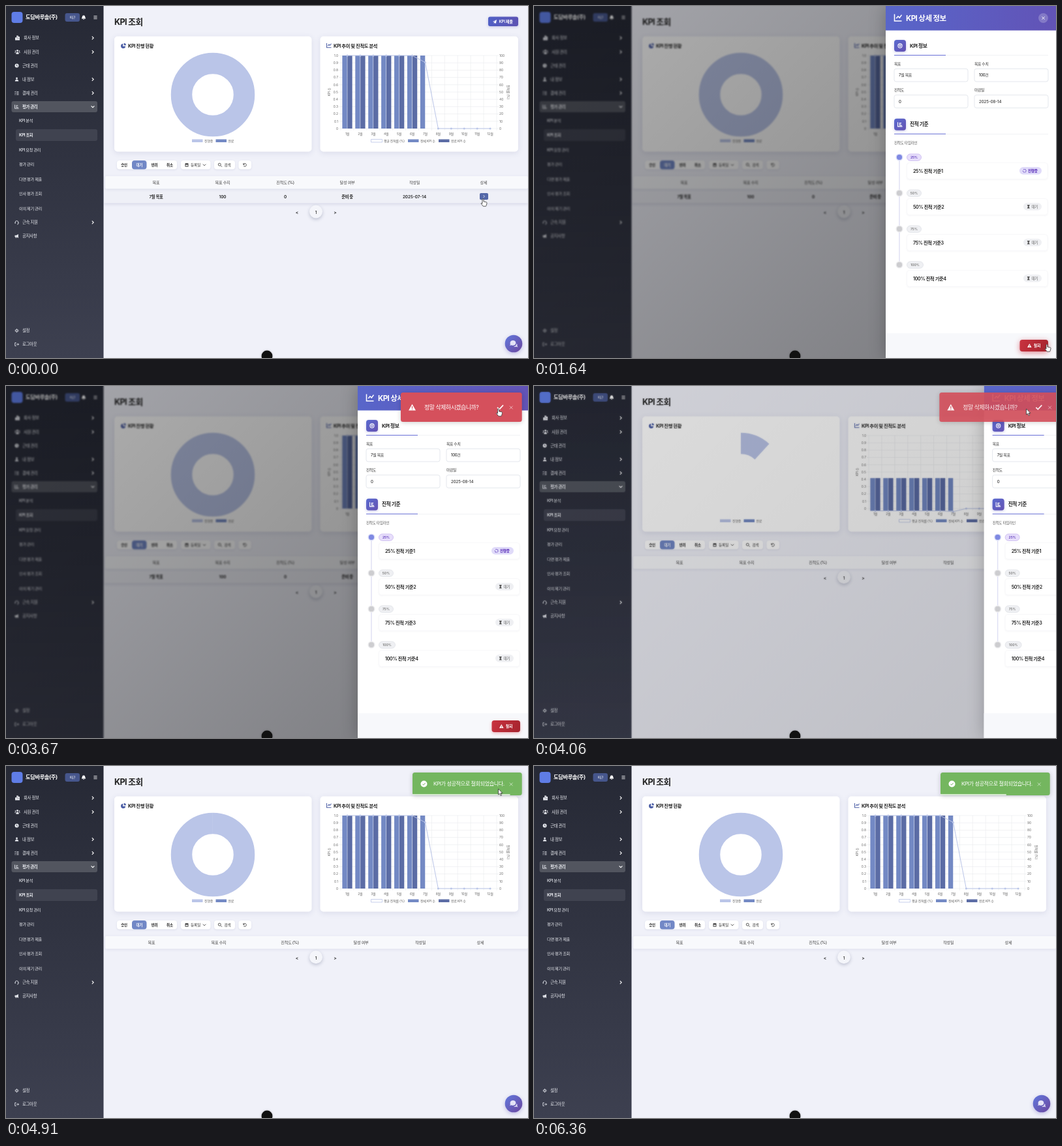
An HTML page with a canvas that plays this animation: 800x540 px, repeating every 6390 ms.

```html
<!DOCTYPE html>
<html lang="ko">
<head>
<meta charset="utf-8">
<style>
html, body { margin: 0; width: 100%; height: 100%; overflow: hidden; background: #f0f1f9; }
canvas { display: block; }
</style>
</head>
<body>
<canvas id="stage" width="800" height="540"></canvas>
<script>
const LOOP = 6390, W = 800, H = 540;
const stage = document.getElementById('stage').getContext('2d');
const pageCanvas = Object.assign(document.createElement('canvas'), { width: W, height: H });
const page = pageCanvas.getContext('2d');
let c = page;

// Icons sit in a box from -5 to 5; a leading ~ means outlined.
const ICONS = {
  city: 'M-5-1h3v-4h4v2h3v8h-10zM-1-3v1.2h1.2v-1.2zM-1 0v1.2h1.2v-1.2zM2 0v1.2h1.2v-1.2z',
  users: 'M-2-3a2 2 0 1 0 4 0a2 2 0 1 0-4 0M-3 4.5v-1.5a3 3 0 0 1 6 0v1.5zM-5.5-2a1.3 1.3 0 1 0 2.6 0a1.3 1.3 0 1 0-2.6 0M2.9-2a1.3 1.3 0 1 0 2.6 0a1.3 1.3 0 1 0-2.6 0M-6 2q0-2 2.4-2l-.6 2zM6 2q0-2-2.4-2l.6 2z',
  clock: 'M-5 0a5 5 0 1 0 10 0a5 5 0 1 0-10 0M-.6-3h1.2v2.8l2 1.4-.7 1-2.5-1.8z',
  user: 'M-2.4-2.5a2.4 2.4 0 1 0 4.8 0a2.4 2.4 0 1 0-4.8 0M-4.5 5a4.5 4.5 0 0 1 9 0z',
  list: '~M-5-3.5l1 1 1.8-2M-5 .3l1 1 1.8-2M-5 4h2M-.5-3h5.5M-.5.5h5.5M-.5 4h5.5',
  bars: '~M-5-5v9.5h10M-2-3h5M-2-.5h3M-2 2h6',
  line: '~M-5-5v9.5h10M-2.5 1l2.5-3 2 2 3-4',
  headset: '~M-4 2v-2a4 4 0 0 1 8 0v2M-4 0v3M4 0v3q0 2-3 2',
  horn: 'M-5-2h4l5-3v10l-5-3h-.5l1 3h-2l-1-3h-1.5z',
  gear: '~M-2.5 0a2.5 2.5 0 1 0 5 0a2.5 2.5 0 1 0-5 0M0-3v-2M0 3v2M-3 0h-2M3 0h2M-2-2l-1.4-1.4M2 2l1.4 1.4M-2 2l-1.4 1.4M2-2l1.4-1.4',
  out: '~M-1.5-4h-3v8h3M-1 0h6M2.5-2.5l2.5 2.5-2.5 2.5',
  bell: 'M0-5q3.5.5 3.5 4l1.3 4h-9.6l1.3-4q0-3.5 3.5-4M-1.5 3.7h3q-.3 1.3-1.5 1.3t-1.5-1.3z',
  menu: '~M-5-4h10M-5 0h10M-5 4h10',
  plane: 'M5-5l-2 10-3-2-2 2v-3.5l5-5-6 4.3-2-1z',
  pie: 'M-1-4a4.5 4.5 0 1 0 5 5h-5zM.8-5v4.2h4.2a4.2 4.2 0 0 0-4.2-4.2z',
  calendar: 'M-4.5-4h2v-1h1.2v1h2.6v-1h1.2v1h2v9h-9zM-3-.5v3.5h6v-3.5z',
  search: '~M-4.5-1a3.3 3.3 0 1 0 6.6 0a3.3 3.3 0 1 0-6.6 0M1.5 1.5l3.5 3.5',
  undo: '~M-4-4.5v3.5h3.5M-4-1a4.2 4.2 0 1 1 .6 3.5',
  warn: 'M0-5l5.5 9.7h-11zM-.6-1.8v3.6h1.2v-3.6zM-.6 2.6v1.2h1.2v-1.2z',
  target: '~M-4.5 0a4.5 4.5 0 1 0 9 0a4.5 4.5 0 1 0-9 0M-1.8 0a1.8 1.8 0 1 0 3.6 0a1.8 1.8 0 1 0-3.6 0',
  glass: 'M-3.5-5h7v1.2h-.7q0 2.6-2 3.8 2 1.2 2 3.8h.7v1.2h-7v-1.2h.7q0-2.6 2-3.8-2-1.2-2-3.8h-.7z',
  chat: 'M-4-1a4 3.6 0 1 1 4 3.6q-1.4 0-2.4-.6l-2.2.8.9-1.6q-.3-1-.3-2.2M3 3.4q2-1.2 2-3.6 1.6 1.4.8 3.2l1 2-2.3-.8q-2 .7-3.6-.6z',
  right: '~M-2-4l4 4-4 4',
  down: '~M-4-2l4 4 4-4',
  tick: '~M-4.5 0l3 3 6-6.5',
  cross: '~M-4-4l8 8M4-4l-8 8'
};

const clamp = v => Math.max(0, Math.min(1, v));
const mix = (a, b, p) => a + (b - a) * p;
const span = (t, from, to) => clamp((t - from) / (to - from));
const smooth = p => p * p * (3 - 2 * p);
const outCubic = p => 1 - (1 - p) ** 3;

function text(s, x, y, size, color, weight = 400, align = 'left') {
  c.font = `${weight} ${size}px Inter, "Noto Sans CJK KR", "Noto Sans CJK", sans-serif`;
  c.letterSpacing = /[가-힣]/.test(s) ? `${-size * 0.05}px` : '0px';
  c.textAlign = align;
  c.fillStyle = color;
  c.fillText(s, x, y + size * 0.36);
}
const mid = (s, x, y, size, color, weight) => text(s, x, y, size, color, weight, 'center');

function box(x, y, x2, y2, r, fill, stroke, shadow) {
  c.save();
  if (shadow) [c.shadowColor, c.shadowBlur, c.shadowOffsetY] = shadow;
  c.beginPath();
  c.roundRect(x, y, x2 - x, y2 - y, r);
  c.fillStyle = fill;
  c.fill();
  c.restore();
  if (stroke) { c.strokeStyle = stroke; c.lineWidth = 0.8; c.stroke(); }
}

function disc(x, y, r, fill, shadow) { box(x - r, y - r, x + r, y + r, r, fill, null, shadow); }

function grad(x, y, x2, y2, a, b) {
  const g = c.createLinearGradient(x, y, x2, y2);
  g.addColorStop(0, a);
  g.addColorStop(1, b);
  return g;
}

function icon(name, x, y, size, color, width = 1.5) {
  const d = ICONS[name], outlined = d[0] === '~';
  const path = new Path2D(outlined ? d.slice(1) : d);
  c.save();
  c.translate(x, y);
  c.scale(size / 10, size / 10);
  c.lineWidth = width;
  c.strokeStyle = c.fillStyle = color;
  outlined ? c.stroke(path) : c.fill(path, 'evenodd');
  c.restore();
}

function sidebar() {
  box(0, 0, 149.5, H, 0, grad(0, 0, 0, H, '#262935', '#3d4050'));
  box(8.5, 9, 25.5, 26, 4, '#5f7de6');
  text('도담바루솔(주)', 30, 17.5, 8.3, '#fff', 700);
  box(90.5, 11, 113, 24, 3, '#46568c');
  mid('퇴근', 101.8, 17.5, 5, '#fff', 500);
  icon('bell', 119, 17.5, 6.5, '#fff');
  icon('menu', 137, 17.5, 5.2, '#fff');

  box(8.5, 146, 140, 163, 3, '#52555f');
  box(15, 189, 140, 207, 3, '#404350');
  const main = [['city', '회사 정보', 49, 'right'], ['users', '사원 관리', 70.5, 'right'], ['clock', '근태 관리', 91.5],
    ['user', '내 정보', 112.5, 'right'], ['list', '결재 관리', 133.5, 'right'], ['bars', '평가 관리', 154.5, 'down'],
    ['headset', '근속 지원', 332, 'right'], ['horn', '공지사항', 353], ['gear', '설정', 498], ['out', '로그아웃', 519]];
  main.forEach(([name, label, y, arrow], i) => {
    icon(name, i < 2 ? 17.5 : 16.5, y, i < 2 ? 7 : 6, '#e4e6ec');
    text(label, i < 2 ? 27 : 25, y, 6.4, '#eceef3', arrow === 'down' ? 700 : 500);
    if (arrow) icon(arrow, 133, y, 6, '#fff', 1.8);
  });
  ['KPI 분석', 'KPI 조회', 'KPI 요청 관리', '평가 관리', '다면 평가 제출', '인사 평가 조회', '이의 제기 관리']
    .forEach((s, i) => text(s, 20, 175.5 + i * 22.55, 6.2, '#eceef3', i === 1 ? 700 : 500));
}

function legend(x, x2, fill, label, stroke) {
  box(x, 204.5, x2, 209, 0, fill, stroke);
  text(label, x2 + 2.5, 206.7, 5, '#666');
}

function charts(p) {
  const LIGHT = '#bac5e8', BLUE = '#7389c4', DEEP = '#5b6ca5';
  const cardShadow = ['rgba(70,80,130,.13)', 8, 2];
  box(166, 46.5, 468.5, 223.5, 5, '#fff', null, cardShadow);
  box(481.5, 46.5, 785, 223.5, 5, '#fff', null, cardShadow);
  icon('pie', 180, 61, 8, '#4d5fa6');
  text('KPI 진행 현황', 187, 61, 7.3, '#222', 700);
  icon('line', 495, 60.5, 7, '#4d5fa6');
  text('KPI 추이 및 진척도 분석', 502, 61, 7.3, '#222', 700);

  c.beginPath();
  c.arc(317, 136, 48, -Math.PI / 2, -Math.PI / 2 + 2 * Math.PI * p);
  c.lineWidth = 32.5;
  c.strokeStyle = LIGHT;
  c.stroke();
  legend(285, 301.5, LIGHT, '진행중');
  legend(321.5, 338, BLUE, '완료');

  const L = 513, R = 752, top = 76, base = 188, step = (R - L) / 12;
  c.lineWidth = 0.5;
  c.strokeStyle = '#e3e4e8';
  c.beginPath();
  for (let i = 0; i <= 12; i++) { c.moveTo(L + i * step, top); c.lineTo(L + i * step, base + 3); }
  for (let i = 0; i <= 10; i++) {
    const y = mix(base, top, i / 10);
    c.moveTo(L - 3, y);
    c.lineTo(R + 3, y);
    text(i ? (i / 10).toFixed(1) : '0', 509, y, 4.9, '#666', 400, 'right');
    text(String(i * 10), 756, y, 4.9, '#666');
  }
  c.stroke();

  const barTop = mix(207, top, p), barBase = mix(135, base, p), points = [];
  for (let i = 0; i < 12; i++) {
    const x = L + (i + 0.5) * step;
    mid(`${i + 1}월`, x, 196, 5, '#666');
    c.fillStyle = BLUE;
    if (i < 7) c.fillRect(x - 7.6, barTop, 7.4, barBase - barTop);
    c.fillStyle = DEEP;
    if (i < 6) c.fillRect(x + 0.3, barTop, 7.4, barBase - barTop);
    points.push([x, i > 6 ? base : mix(207, i < 6 ? top : 86.5, p)]);
  }
  c.beginPath();
  points.forEach(q => c.lineTo(...q));
  c.strokeStyle = LIGHT;
  c.lineWidth = 1;
  c.stroke();
  points.forEach(q => disc(...q, 1.5, LIGHT));

  [['KPI 수', 495, -1], ['진척률 (%)', 770, 1]].forEach(([s, x, dir]) => {
    c.save();
    c.translate(x, 132);
    c.rotate(dir * Math.PI / 2);
    mid(s, 0, 0, 5, '#666');
    c.restore();
  });
  legend(559.5, 576.5, '#fff', '평균 진척률 (%)', LIGHT);
  legend(616, 632.5, BLUE, '전체 KPI 수');
  legend(663, 679.5, DEEP, '완료 KPI 수');
}

function filters() {
  const shadow = ['rgba(70,80,130,.12)', 3, 1];
  [[170, 262], [268, 313.5], [319, 351], [356.5, 376]].forEach(([a, b]) => box(a, 237, b, 250.5, 4, '#fff', null, shadow));
  box(193, 237, 215.5, 250.5, 4, '#7288c6');
  ['승인', '대기', '반려', '취소'].forEach((s, i) => mid(s, 181 + i * 23.3, 243.8, 5.5, i === 1 ? '#fff' : '#222', 600));
  icon('calendar', 277, 243.8, 5.5, '#333');
  text('등록일', 283, 243.8, 5.7, '#333', 500);
  icon('down', 304, 243.8, 5.5, '#333');
  icon('search', 328, 243.8, 6, '#333', 1.3);
  text('검색', 334.5, 243.8, 5.7, '#333', 500);
  icon('undo', 366, 243.8, 5.5, '#333');
}

function table(hasRow) {
  if (hasRow) box(150, 281, 800, 302.5, 0, '#eff0f7', null, ['rgba(70,80,130,.2)', 5, 1.5]);
  box(152, 261, 800, 280.5, 2, '#f8f9fc', null, ['rgba(70,80,130,.12)', 4, 1]);
  const cols = hasRow ? [230, 332, 428, 523, 626, 732] : [223, 326, 435, 544, 635, 727];
  ['목표', '목표 수지', '진척도 (%)', '달성 여부', '작성일', '상세']
    .forEach((s, i) => mid(s, cols[i], 270.7, 6.2, '#444', 500));
  if (hasRow) {
    ['7월 목표', '100', '0', '준비 중', '2025-07-14'].forEach((s, i) => mid(s, cols[i], 292.3, 6.3, '#222', 600));
    box(726, 287, 739, 297.2, 2, '#5468a8');
    icon('right', 732.5, 292, 5, '#fff');
  }
  const y = hasRow ? 316.5 : 294.3;
  disc(475, y - 1, 10, '#f4f5fa', ['rgba(40,50,90,.25)', 5, 2]);
  mid('<', 446, y, 6.6, '#222', 600);
  mid('1', 475, y, 6.2, '#333', 600);
  mid('>', 504.5, y, 6.6, '#222', 600);
}

function drawPage(t) {
  c = page;
  box(0, 0, W, H, 0, '#f0f1f9');
  sidebar();
  text('KPI 조회', 166, 24, 12.7, '#222', 700);
  box(739, 16.5, 785, 31, 3, grad(739, 16, 785, 31, '#4f60c6', '#5d52b2'), null, ['rgba(80,80,180,.3)', 4, 1]);
  icon('plane', 749, 24, 6, '#fff');
  text('KPI 제출', 755.5, 24, 6.2, '#fff', 600);
  const reloaded = t >= 4030;
  charts(reloaded ? 1 - (1 - span(t, 4030, 5030)) ** 4 : 1);
  filters();
  table(!reloaded);
  disc(778, 518, 13.3, grad(768, 508, 788, 528, '#6272d6', '#6a4da6'), ['rgba(90,80,180,.35)', 6, 2]);
  icon('chat', 777, 518, 11, '#e4e3f6');
}

function section(y, name, title) {
  box(552, y, 570, y + 18, 4, grad(552, y, 570, y + 18, '#5a6bd0', '#6552b2'), null, ['rgba(90,90,190,.3)', 4, 1.5]);
  icon(name, 561, y + 9, 7, '#fff');
  text(title, 576, y + 9, 7.7, '#222', 700);
  box(552, y + 23.2, 788, y + 23.8, 0, '#e3e5ec');
  box(552, y + 23, 631, y + 24.1, 0, '#686fd6');
}

function field(x, y, label, value) {
  text(label, x, y, 5.8, '#333', 500);
  box(x, y + 7.3, x + 113, y + 27, 3, '#fff', '#dde1e9');
  text(value, x + 7, y + 17.3, 6, '#333', 500);
}

function milestone(i, t) {
  const y = 232 + i * 55, on = i === 0, pct = `${25 * (i + 1)}%`;
  disc(560, y, 5.6, on ? '#dcdff8' : '#ececee');
  disc(560, y, 4.1, on ? '#7f89e2' : '#cdcdd0');
  const end = i === 3 ? 596.5 : 593.5;
  box(571.5, y - 5, end, y + 5.3, 5.2, on ? '#e7defb' : '#eff0f3', on ? '#c8b6ef' : '#dfe1e6');
  mid(pct, (571.5 + end) / 2, y + 0.2, 5, on ? '#5a35b8' : '#777', 600);
  box(571.5, y + 8.5, 787, y + 33.5, 4, '#fff', '#f6f6f9', ['rgba(60,60,100,.06)', 3, 1]);
  text(`${pct} 진척 기준${i + 1}`, 581, y + 21, 7.2, '#222', 600);
  box(on ? 744 : 750, y + 15, 778, y + 26.5, 5.7, on ? '#e0dbf9' : '#eff0f3');
  if (!on) {
    icon('glass', 757.8, y + 20.8, 5.6, '#555');
    text('대기', 762.5, y + 20.8, 5.5, '#555', 500);
    return;
  }
  text('진행중', 757, y + 20.8, 5.6, '#5326b5', 700);
  c.save();
  c.translate(751.7, y + 20.8);
  c.rotate(t / 1000 * Math.PI * 2);
  c.setLineDash([1.35, 0.8]);
  c.beginPath();
  c.arc(0, 0, 2.4, 0, 5.4);
  c.strokeStyle = '#5a35b8';
  c.lineWidth = 1;
  c.stroke();
  c.restore();
}

function drawer(t, open) {
  c.save();
  c.translate(261 * (1 - open), 0);
  box(539, 0, W, H, 0, '#fff', null, ['rgba(0,0,0,.25)', 24, 0]);
  box(539, 0, W, 37.5, 0, grad(539, 0, W, 37, '#5866ca', '#6253b6'));
  icon('line', 558, 18, 11, '#fff', 1.4);
  text('KPI 상세 정보', 570, 18.7, 11.5, '#fff', 700);
  disc(780.5, 18.5, 7.4, 'rgba(255,255,255,.22)');
  icon('cross', 780.5, 18.5, 5, '#fff', 2);

  section(52, 'target', 'KPI 정보');
  field(552, 89, '목표', '7월 목표');
  field(675, 89, '목표 수치', '100건');
  field(552, 129.3, '진척도', '0');
  field(675, 129.3, '마감일', '2025-08-14');
  section(172.7, 'bars', '진척 기준');
  text('진척도 타임라인', 552, 210, 5.6, '#555', 500);
  box(559.3, 232, 560.7, 397, 0, '#dedff3');
  for (let i = 0; i < 4; i++) milestone(i, t);

  box(539, 502, W, H, 0, '#f7f8fb');
  const lift = span(t, 1170, 1300) * (1 - span(t, 2000, 2130));
  const y = 513 - lift;
  box(744.5, y, 788, y + 18, 4, grad(744, y, 788, y + 18, '#c9323f', '#a5242e'), null,
    [`rgba(200,40,55,${0.3 + lift * 0.25})`, 5 + lift * 4, 2]);
  icon('warn', 759.3, y + 9, 6, '#fff');
  text('철회', 765.8, y + 9, 5.9, '#fff', 700);
  c.restore();
}

// Horizontal offset and opacity of a toast entering or leaving with a bounce.
function enter(p) {
  const keys = [[0, 1250], [0.6, -10], [0.75, 4], [0.9, -2], [1, 0]];
  const i = Math.max(1, keys.findIndex(k => k[0] >= p));
  const [a, from] = keys[i - 1], [b, to] = keys[i];
  return [mix(from, to, outCubic(span(p, a, b))), clamp(p / 0.3)];
}
function leave(p) {
  return p < 0.2 ? [-8 * smooth(p / 0.2), 1] : [mix(-8, 833, smooth(span(p, 0.2, 1))), 1 - span(p, 0.2, 1)];
}

function toast([dx, alpha], x, y2, fill, paint) {
  c.save();
  c.globalAlpha = alpha;
  c.translate(dx, 0);
  box(x, 10, 790.7, y2, 3.5, fill, null, ['rgba(0,0,0,.2)', 7, 1]);
  paint();
  icon('cross', 774.2, (10 + y2) / 2 + 0.5, 6, 'rgba(255,255,255,.6)', 1.5);
  c.restore();
}

function toasts(t) {
  if (t >= 1850 && t < 4600) {
    const pose = t < 3850 ? enter(span(t, 1850, 2600)) : leave(span(t, 3850, 4600));
    toast(pose, 605, 55, '#d5505c', () => {
      icon('warn', 622.5, 32.8, 10, '#fff');
      text('정말 삭제하시겠습니까?', 641, 32.8, 8.9, '#fff');
      icon('tick', 757.5, 32.8, mix(7.5, 10, span(t, 3200, 3320)), '#fff', 1.7);
    });
  }
  if (t >= 3980) {
    // The countdown rests while the pointer is over the toast.
    const spent = Math.min(t - 3980, 500) + Math.max(0, t - 4860);
    toast(enter(span(t, 3980, 4730)), 623, 45, '#74b65f', () => {
      disc(640.5, 27.5, 5, '#fff');
      icon('tick', 640.5, 27.7, 5, '#74b65f', 2);
      text('KPI가 성공적으로 철회되었습니다.', 655, 27.5, 8.1, '#fff');
      box(623, 43, 623 + 168 * (1 - spent / 5000), 45, [0, 0, 0, 2], 'rgba(255,255,255,.7)');
    });
  }
}

function cursor(t) {
  if (t > 5250) return;
  const path = [[0, 731, 296], [650, 731, 296], [1250, 786, 519], [1950, 786, 519],
    [2670, 763.5, 199], [3300, 754.5, 35], [4950, 754.5, 35], [5250, 790, -14]];
  const i = path.findIndex(k => k[0] >= t) || 1;
  const a = path[i - 1], b = path[i], p = smooth(span(t, a[0], b[0]));
  const hand = t < 200 || (t > 1170 && t < 2000) || (t > 3200 && t < 3900);
  const shape = new Path2D(hand
    ? 'M-1 1q0-1.2 1-1.2t1 1.2v3l4 .8q1.2.3 1 1.6l-.7 3.2-.8 1.6h-4.2l-3-3.8q-.6-1.2.8-1l.9.8z'
    : 'M0 0v9l2.1-1.9 1.5 3.4 1.5-.7-1.5-3.2h2.9z');
  c.save();
  c.translate(mix(a[1], b[1], p), mix(a[2], b[2], p));
  c.fillStyle = '#fff';
  c.strokeStyle = '#333';
  c.lineWidth = 0.8;
  c.fill(shape);
  c.stroke(shape);
  c.restore();
}

function draw(t) {
  drawPage(t);
  c = stage;
  c.drawImage(pageCanvas, 0, 0);
  const open = t < 2000 ? outCubic(span(t, 130, 500)) : 1 - smooth(span(t, 3890, 4200));
  if (open > 0) {
    c.save();
    c.globalAlpha = open;
    c.filter = 'blur(1.2px)';
    c.drawImage(pageCanvas, 0, 0);
    c.filter = 'none';
    box(0, 0, W, H, 0, grad(65, -65, 735, 605, 'rgba(0,0,0,.3)', 'rgba(0,0,0,.5)'));
    c.restore();
    drawer(t, open);
  }
  disc(400, 537, 8.4, '#111', ['rgba(0,0,0,.3)', 3, 0]);
  toasts(t);
  cursor(t);
}

const start = performance.now();
function tick() {
  draw((performance.now() - start) % LOOP);
  requestAnimationFrame(tick);
}
tick();
</script>
</body>
</html>
```
